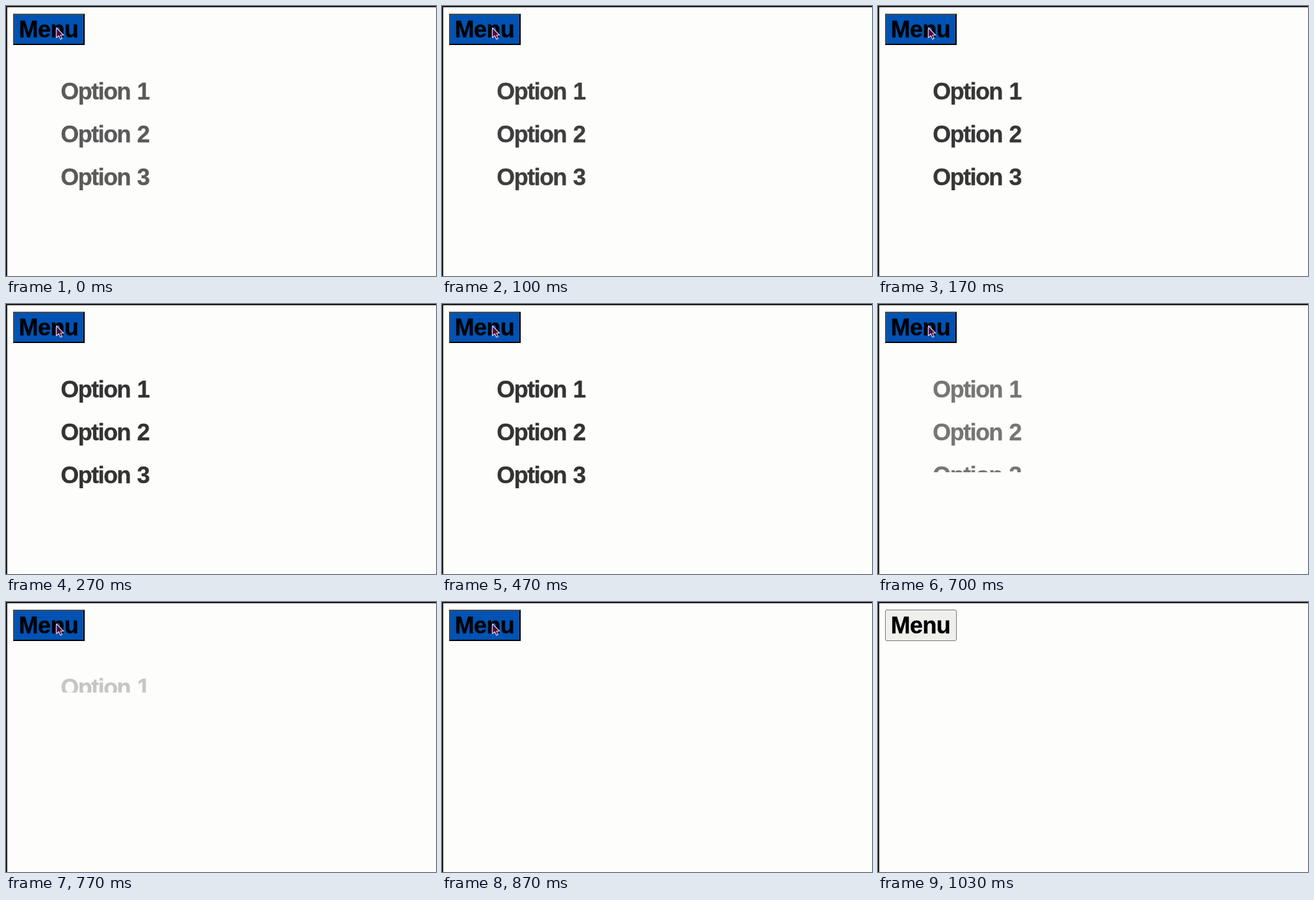
Recreate the animation shown at these times as an HTML page. Size 672x422 px, loop 1.76 s.

```html
<!DOCTYPE html>
<html lang="en">
<head>
<meta charset="utf-8">
<title>Menu</title>
<style>
  html, body { margin: 0; width: 100%; height: 100%; overflow: hidden; background: #fdfdfb; }
  svg { display: block; width: 672px; height: 422px; }
  text { font-family: "Liberation Sans", Arial, sans-serif; font-weight: bold; }
  #options { font-size: 36.5px; letter-spacing: -1.5px; word-spacing: 2px; fill: #333; stroke: #333; stroke-width: .4; }
  #label { font-size: 36.6px; letter-spacing: -.6px; fill: #000; stroke: #000; stroke-width: .4; }
</style>
</head>
<body>
<svg viewBox="0 0 672 422">
  <defs>
    <clipPath id="fold"><rect id="window" x="0" y="61" width="672" height="303"/></clipPath>
  </defs>
  <rect width="672" height="422" fill="#fdfdfb"/>
  <path d="M0 0H672V2H2V422H0Z" fill="#202020"/>

  <g id="idle">
    <rect x="11.5" y="12.5" width="111" height="48" rx="2.5" fill="#efefec" stroke="#767676"/>
  </g>
  <g id="active">
    <rect x="11" y="12" width="112" height="49" fill="#0053b3"/>
    <path id="upper" d="M11 61V12H123L121 14H13V59Z"/>
    <path id="lower" d="M123 12V61H11L13 59H121V14Z"/>
  </g>
  <text id="label" x="20" y="49">Menu</text>

  <g clip-path="url(#fold)">
    <g id="options">
      <text x="85.5" y="145.5">Option 1</text>
      <text x="85.5" y="212.5">Option 2</text>
      <text x="85.5" y="279.5">Option 3</text>
    </g>
  </g>

  <path id="cursor" d="M.5 .5V16L4.2 12.8L6.8 18.3L9.4 17.1L7 11.9H11.6Z"
        fill="#4f0540" stroke="#ecdcec" stroke-width="1.1" stroke-linejoin="round"/>
</svg>
<script>
const LOOP = 1760;
const OPEN = { start: -250, length: 500 };
const CLOSE = { start: 635, length: 300 };
const PRESS = 570, RELEASE = 670, LEAVE = 1000, GONE = 1030;
const BOX_HEIGHT = 303;
const DARK = "#000", LIGHT = "#4c4c4c";

const $ = id => document.getElementById(id);
const show = (id, on) => $(id).setAttribute("visibility", on ? "visible" : "hidden");

// The CSS "ease" curve, cubic-bezier(.25, .1, .25, 1).
function ease(x) {
  if (x <= 0) return 0;
  if (x >= 1) return 1;
  const curve = (a, b, u) => 3 * a * u * (1 - u) ** 2 + 3 * b * u * u * (1 - u) + u ** 3;
  let low = 0, high = 1;
  for (let i = 0; i < 24; i++) {
    const mid = (low + high) / 2;
    if (curve(.25, .25, mid) < x) low = mid; else high = mid;
  }
  return curve(.1, 1, low);
}

const progress = (phase, t) => ease((t - phase.start) / phase.length);

// The picture advances thirty times a second.
const snap = t => Math.floor((t + 3.4) * .03) / .03;

function cursorAt(t) {
  if (t < 965) return [78.3, 33.6];
  return t < LEAVE - 5 ? [96, 30] : [461, 4];
}

function draw(time) {
  const t = snap(time % LOOP);
  const closing = progress(CLOSE, t);
  const shown = closing ? 1 - closing : progress(OPEN, t);
  $("options").setAttribute("opacity", shown);
  $("window").setAttribute("height", closing ? BOX_HEIGHT * shown : BOX_HEIGHT);

  const pressed = t >= PRESS - 5 && t < RELEASE - 5;
  $("upper").setAttribute("fill", pressed ? DARK : LIGHT);
  $("lower").setAttribute("fill", pressed ? LIGHT : DARK);

  const hover = t < LEAVE - 5;
  show("active", hover);
  show("idle", !hover);
  show("cursor", t < GONE - 5);
  $("cursor").setAttribute("transform", `translate(${cursorAt(t)})`);
}

const began = performance.now();
function tick() {
  draw(performance.now() - began);
  requestAnimationFrame(tick);
}
tick();
</script>
</body>
</html>
```
